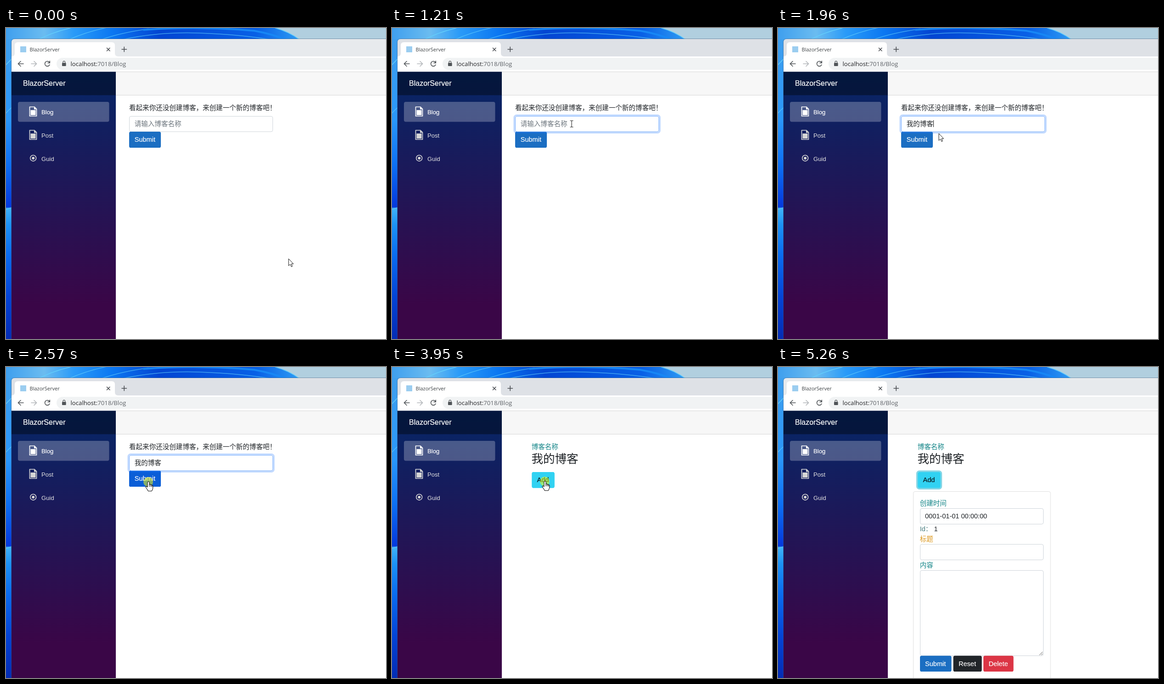
Recreate the animation shown at these times as an HTML page. Size 827 by 678 pixels, loop 5330 ms.

```html
<!DOCTYPE html>
<html lang="zh-CN">
<head>
<meta charset="utf-8">
<style>
  html, body { margin: 0; width: 100%; height: 100%; overflow: hidden; background: #fff; }
  svg { display: block; width: 827px; height: 678px; }
  text { font: 14.55px "Liberation Sans", "Noto Sans CJK SC", "Noto Sans CJK", sans-serif; fill: #212529; white-space: pre; }
  .ui { font-family: "Open Sans", "Noto Sans", sans-serif; }
  .nav { font-size: 13.1px; fill: #e2e2e2; }
  .light { fill: #fff; stroke: #fff; stroke-width: .2; }
  .teal { fill: #128487; }
  .field { fill: #fff; stroke: #ced4da; }
  .line { fill: none; stroke-linecap: round; }
</style>
</head>
<body>
<svg viewBox="0 0 827 678">
  <defs>
    <linearGradient id="topBlue">
      <stop offset="0" stop-color="#3f9fee"/><stop offset=".13" stop-color="#6bbcf0"/>
      <stop offset=".23" stop-color="#2a9bf8"/>
      <stop offset=".36" stop-color="#0b78f2"/><stop offset=".52" stop-color="#0345d2"/>
      <stop offset=".85" stop-color="#0860e6"/><stop offset="1" stop-color="#2f9cf4"/>
    </linearGradient>
    <linearGradient id="leftBlue" x2="0" y2="1">
      <stop offset="0" stop-color="#3f9fee"/><stop offset=".27" stop-color="#2a97f9"/>
      <stop offset=".42" stop-color="#0d70f4"/><stop offset=".56" stop-color="#0438dd"/>
      <stop offset=".565" stop-color="#3fb2f8"/><stop offset=".62" stop-color="#1c92f5"/>
      <stop offset=".72" stop-color="#0a6cf0"/><stop offset=".86" stop-color="#0444d6"/>
      <stop offset="1" stop-color="#042cb4"/>
    </linearGradient>
    <linearGradient id="sidebar" x2="0" y2="1">
      <stop offset="0" stop-color="#052767"/><stop offset=".87" stop-color="#3a0647"/>
    </linearGradient>
    <filter id="soft" x="-10%" y="-30%" width="120%" height="170%">
      <feDropShadow dx="0" dy="1" stdDeviation="1.2" flood-opacity=".3"/>
    </filter>
    <g id="page">
      <path d="M1 1H11.5L16 5.5V21H1Z" fill="none" stroke="currentColor" stroke-width="1.7" stroke-linejoin="round"/>
      <path d="M3 8H14V19H3ZM10.5 1V6.5H16Z" fill="currentColor"/>
    </g>
  </defs>

  <!-- desktop -->
  <rect width="827" height="678" fill="#b1cfdf"/>
  <path d="M0 0H586Q616 8 640 26H0Z" fill="url(#topBlue)"/>
  <rect y="24" width="14" height="654" fill="url(#leftBlue)"/>
  <g class="line" stroke="#62cdfa" stroke-width="1.5">
    <path d="M-10 92Q45 22 140 0M586 0Q616 8 640 26"/>
    <path d="M135 26Q180 6 230-3M205 26Q250 10 310 2M250 26Q330 8 420 11T580 26" opacity=".65"/>
    <path d="M300 4Q420-5 540 6Q580 13 610 26" stroke="#1787f5" stroke-width="4"/>
    <path d="M-2 188Q6 178 14 172M-2 396L14 391" opacity=".7"/>
  </g>

  <!-- browser -->
  <path d="M11.5 678V31Q11.5 23.5 19 23.5H827" fill="none" stroke="#35557a" stroke-opacity=".5"/>
  <path id="strip" d="M12 678V31Q12 24 19 24H827V678Z"/>
  <path d="M12 62Q19 62 19 55V38Q19 31 26 31H230Q237 31 237 38V55Q237 62 244 62H827V95H12Z" fill="#fff"/>
  <rect x="31" y="40" width="13" height="13" fill="#9bcdf0"/>
  <text class="ui" x="51.5" y="51" style="font-size:11px;fill:#3c4043">BlazorServer</text>
  <path class="line" d="M219.5 43.5L226 50M226 43.5L219.5 50M252 46.5H262.5M257.2 41.2V51.8" stroke="#45484d" stroke-width="1.5"/>
  <rect x="110" y="65" width="740" height="26" rx="13" fill="#f1f3f4"/>
  <g class="line" stroke="#505458" stroke-width="1.6">
    <path d="M38 78H26.5M32 72.5L26.5 78L32 83.5"/>
    <path d="M55 78H66.5M61 72.5L66.5 78L61 83.5" stroke="#b3b6ba"/>
    <path d="M94.5 75A5.4 5.4 0 1 0 95 80M95.3 72V76.3H91"/>
    <path d="M124 76.5V74.5A2.3 2.3 0 0 1 128.6 74.5V76.5" stroke-width="1.2"/>
  </g>
  <rect x="122" y="76" width="8.6" height="7" rx="1" fill="#505458"/>
  <text class="ui" x="140.5" y="82.5" style="font-size:13.2px;fill:#202124">localhost:<tspan fill="#5f6368">7018/Blog</tspan></text>

  <!-- page frame -->
  <path d="M12 95H827V678H12Z" fill="#fff"/>
  <path d="M239 95.5H827V146H239Z" fill="#f7f7f7"/>
  <path d="M12 95.5H827M239 146.5H827" stroke="#d6d6d6"/>
  <rect x="12" y="95.5" width="227" height="582.5" fill="url(#sidebar)"/>
  <rect x="12" y="95.5" width="227" height="51" fill-opacity=".4"/>
  <text class="light" x="37" y="126" style="font-size:16px">BlazorServer</text>
  <rect x="26" y="161" width="198.5" height="43.5" rx="4" fill="#fff" fill-opacity=".25"/>
  <use href="#page" x="50.5" y="171" color="#fff"/>
  <use href="#page" x="50.5" y="222" color="#d7d7d7"/>
  <circle cx="59.2" cy="283.7" r="6.4" fill="none" stroke="#d7d7d7" stroke-width="1.6"/>
  <circle cx="59.2" cy="283.7" r="3" fill="#d7d7d7"/>
  <text class="nav light" x="77" y="187.5">Blog</text>
  <text class="nav" x="77" y="238.5">Post</text>
  <text class="nav" x="77" y="289.5">Guid</text>

  <!-- create a blog -->
  <g id="createView">
    <text x="268" y="178.5">看起来你还没创建博客，来创建一个新的博客吧！</text>
    <rect class="field" x="268.5" y="192.5" width="312" height="33.5" rx="3.6"/>
    <rect x="268" y="226" width="69" height="35" rx="3.6" fill="#1b6ec2"/>
    <rect id="submitHover" x="268" y="226" width="69" height="35" rx="3.6" fill="#0b5ed7"/>
    <rect id="submitRing" x="266.2" y="224.2" width="72.6" height="38.6" rx="5" fill="none" stroke="#3184fd" stroke-opacity=".5" stroke-width="3.6"/>
    <text class="light" x="279.7" y="248">Submit</text>
    <g id="inputRing">
      <rect x="266.2" y="190.2" width="316.6" height="38" rx="5" fill="none" stroke="#0d6efd" stroke-opacity=".25" stroke-width="3.6"/>
      <rect x="268.5" y="192.5" width="312" height="33.5" rx="3.6" fill="#fff" stroke="#86b7fe"/>
    </g>
    <text id="nameText" x="279.7" y="214"></text>
    <rect id="caret" y="201" width="1" height="15" fill="#111"/>
    <g id="popup">
      <rect x="269" y="227" width="311" height="47.5" rx="3" fill="#fff" filter="url(#soft)"/>
      <text x="279.7" y="254.5" style="font-size:11.8px">我的博客</text>
    </g>
  </g>

  <!-- blog with post form -->
  <g id="blogView">
    <text class="teal" x="303.7" y="178.5">博客名称</text>
    <text x="303.5" y="208.5" style="font-size:25.5px">我的博客</text>
    <rect id="addRing" x="302.7" y="227.2" width="52.6" height="38.1" rx="5" fill="none" stroke="#0baccc" stroke-opacity=".5" stroke-width="3.6"/>
    <rect x="304.5" y="229" width="49" height="34.5" rx="3.6" fill="#0dcaf0"/>
    <rect id="addHover" x="304.5" y="229" width="49" height="34.5" rx="3.6" fill="#31d2f2"/>
    <text x="315.5" y="251" style="fill:#000">Add</text>
    <g id="form">
      <rect x="294.5" y="271.5" width="298.5" height="430" rx="3.6" fill="#fff" stroke="#dfdfdf"/>
      <text class="teal" x="308.7" y="302">创建时间</text>
      <rect class="field" x="309.5" y="308.5" width="268" height="34" rx="3.6"/>
      <text x="320" y="330">0001-01-01 00:00:00</text>
      <text x="308.7" y="358" style="fill:#4c7f82">Id：</text>
      <text x="339.5" y="358">1</text>
      <text x="308.7" y="380" style="fill:#dc981f">标题</text>
      <rect class="field" x="309.5" y="386.5" width="268" height="34" rx="3.6"/>
      <text class="teal" x="308.7" y="436.5">内容</text>
      <rect class="field" x="309.5" y="443.5" width="268" height="186" rx="3.6"/>
      <path d="M569 628L576 621M573 628L576 625" stroke="#555"/>
      <rect x="309" y="629.5" width="68.5" height="34.5" rx="3.6" fill="#1b6ec2"/>
      <rect x="381.5" y="629.5" width="62" height="34.5" rx="3.6" fill="#212529"/>
      <rect x="447" y="629.5" width="65.5" height="34.5" rx="3.6" fill="#dc3545"/>
      <text class="light" x="320" y="651.5">Submit</text>
      <text class="light" x="393" y="651.5">Reset</text>
      <text class="light" x="458.5" y="651.5">Delete</text>
    </g>
  </g>

  <g id="pointer">
    <circle id="click" cx="-.5" cy=".5" r="10.5" fill="#ff0" fill-opacity=".5"/>
    <path id="arrow" d="M0 0V15.3L3.6 12.1L6 17.5L8.3 16.5L6 11.2H10.5Z" fill="#fff" stroke="#111"/>
    <path id="beam" d="M-3.5-7H-1L0-6L1-7H3.5M0-6V6M-3.5 7H-1L0 6L1 7H3.5" fill="none" stroke="#222" stroke-width="1.1"/>
    <g id="hand" stroke="#111" stroke-width="1.1">
      <path d="M-2 1.5Q0-2 2 1.5V6Q4.3 5 5 7Q7 6 7.5 8Q9.5 7.5 9.7 10V14Q9 18 7 20.5H-.5Q-3 16-6 12Q-6 9-2 11.5Z" fill="#fff"/>
      <path d="M2 6V11M5 7V11M7.5 8V11.5" fill="none"/>
    </g>
  </g>
</svg>
<script>
const LOOP = 5330;
const BLOG_AT = 2920, FORM_AT = 4160;
const el = id => document.getElementById(id);
const show = (id, on) => el(id).style.display = on ? "" : "none";
const fade = (id, opacity) => el(id).style.opacity = opacity;
const ramp = (t, from, to) => Math.min(1, Math.max(0, (t - from) / (to - from)));
const within = (t, from, to) => t >= from && t < to;
const smooth = u => u * u * (3 - 2 * u);
const linear = u => u;

// Pointer stops: time, x, y, easing towards the stop
const stops = [
  [0, 615, 503, linear], [550, 391, 209, smooth], [1680, 391, 209, linear],
  [2240, 310, 250, smooth], [3080, 310, 250, linear], [3360, 349, 256, smooth],
  [3620, 333, 249, smooth], [4130, 333, 249, linear],
  [4440, 437, 320, u => u * u], [4860, 771, 668, linear], [4930, 827, 726, linear]
];
const clicks = [680, 2570, 3950];

function pointerAt(t) {
  const i = stops.findIndex(s => s[0] > t);
  if (i < 0) return null;
  const [t0, x0, y0] = stops[i - 1], [t1, x1, y1, ease] = stops[i];
  const u = ease((t - t0) / (t1 - t0));
  return [x0 + (x1 - x0) * u, y0 + (y1 - y0) * u];
}

function pointerShape(t, [x, y]) {
  const over = (l, top, r, b) => x >= l && x <= r && y >= top && y <= b;
  if (t < BLOG_AT) {
    if (over(268, 192, 580, 226)) return "beam";
    return over(268, 226, 337, 261) ? "hand" : "arrow";
  }
  if (over(304, 229, 354, 264)) return "hand";
  const overField = over(309, 308, 578, 343) || over(309, 386, 578, 421) || over(309, 443, 578, 629);
  return t >= FORM_AT && overField ? "beam" : "arrow";
}

function draw(t) {
  const typed = t >= 1610;
  el("strip").setAttribute("fill", within(t, 680, 5260) ? "#dee1e6" : "#e7eaed");
  show("createView", t < BLOG_AT);
  show("blogView", t >= BLOG_AT);
  show("form", t >= FORM_AT);

  const name = el("nameText");
  name.textContent = typed ? "我的博客" : "请输入博客名称";
  name.style.fill = typed ? "#212529" : "#6c757d";
  show("caret", within(t, 680, 1210) || within(t, 1610, 2170));
  el("caret").setAttribute("x", typed ? 338 : 280);
  fade("popup", typed ? .85 * (1 - ramp(t, 1610, 1750)) : 0);

  fade("inputRing", ramp(t, 680, 820) * (1 - ramp(t, 2640, 2780)));
  fade("submitHover", ramp(t, 2100, 2310));
  fade("submitRing", ramp(t, 2640, 2780));
  fade("addHover", ramp(t, 3000, 3200));
  fade("addRing", ramp(t, 4020, 4160));

  const spot = pointerAt(t);
  show("pointer", spot);
  if (!spot) return;
  const shape = pointerShape(t, spot);
  for (const id of ["arrow", "beam", "hand"]) show(id, id === shape);
  el("pointer").setAttribute("transform", `translate(${spot.map(Math.round)})`);
  show("click", clicks.some(c => within(t, c, c + 100)));
}

function tick() {
  draw(performance.now() % LOOP);
  requestAnimationFrame(tick);
}
tick();
</script>
</body>
</html>
```
